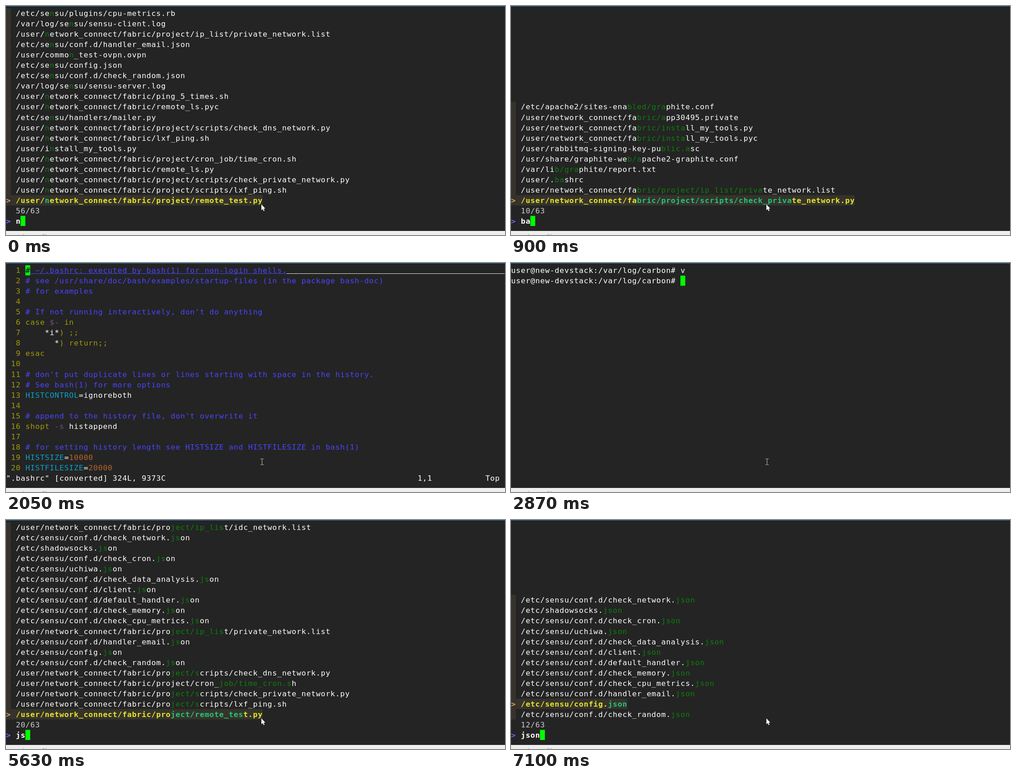
An HTML page with a canvas for the animation above (8000 ms loop, 1102x508 px).

```html
<!DOCTYPE html>
<html lang="en">
<head>
<meta charset="utf-8">
<title>Fuzzy file finder in a terminal</title>
<style>
  html, body { margin: 0; width: 100%; height: 100%; overflow: hidden; background: #242424; }
  canvas { display: block; width: 1102px; height: 508px; }
</style>
</head>
<body>
<canvas id="stage" width="1102" height="508"></canvas>
<script>
const ctx = document.getElementById('stage').getContext('2d');
const LOOP = 8000, CELL = 10.69, ROW = 23.03, TOP = 5, BASELINE = 17.2, LIST_ROWS = 19;
const FONT = '16.6px "DejaVu Sans Mono", monospace';

const C = {
  bg: '#242424', bar: '#35332b', cursor: '#00ff00', pointer: '#dfa06a', prompt: '#6c6aff',
  match: '#0a800a', picked: '#e9e42c', pickedMatch: '#22c67c', info: '#cccccc',
  w: '#ffffff', b: '#4a45ff', y: '#a09a08', p: '#75506f', c: '#08a2cb', n: '#b5652c'
};

const fabric = '/user/network_connect/fabric/';
const project = fabric + 'project/';
const confd = '/etc/sensu/conf.d/';

// Listed from the bottom of the screen upwards.
const files = [
  project + 'remote_test.py',
  project + 'scripts/lxf_ping.sh',
  project + 'scripts/check_private_network.py',
  fabric + 'remote_ls.py',
  project + 'cron_job/time_cron.sh',
  '/user/install_my_tools.py',
  fabric + 'lxf_ping.sh',
  project + 'scripts/check_dns_network.py',
  '/etc/sensu/handlers/mailer.py',
  '/tmp/date.txt',
  fabric + 'remote_ls.pyc',
  fabric + 'ping_5_times.sh',
  '/var/log/sensu/sensu-server.log',
  confd + 'check_random.json',
  '/etc/sensu/config.json',
  '/user/common_test-ovpn.ovpn',
  confd + 'handler_email.json',
  '/usr/share/dict/words',
  project + 'ip_list/private_network.list',
  '/var/log/sensu/sensu-client.log',
  '/etc/sensu/plugins/cpu-metrics.rb',
  '/user/.bashrc',
  '/var/lib/graphite/report.txt',
  '/usr/share/graphite-web/apache2-graphite.conf',
  '/user/rabbitmq-signing-key-public.asc',
  fabric + 'install_my_tools.pyc',
  fabric + 'install_my_tools.py',
  fabric + 'app30495.private',
  '/etc/apache2/sites-enabled/graphite.conf',
  ...['check_cpu_metrics', 'check_memory', 'default_handler', 'client', 'check_data_analysis']
    .map(name => confd + name + '.json'),
  '/etc/sensu/uchiwa.json',
  confd + 'check_cron.json',
  '/etc/shadowsocks.json',
  confd + 'check_network.json',
  project + 'ip_list/idc_network.list',
  project + 'ip_list/dev_network.list'
];

// Each segment starts with its colour key.
const vimLines = [
  'b# ~/.bashrc: executed by bash(1) for non-login shells.',
  'b# see /usr/share/doc/bash/examples/startup-files (in the package bash-doc)',
  'b# for examples',
  '',
  "b# If not running interactively, don't do anything",
  'ycase |p$-|y in',
  'w    *i*|y) ;;',
  'w      *|y) return;;',
  'yesac',
  '',
  "b# don't put duplicate lines or lines starting with space in the history.",
  'b# See bash(1) for more options',
  'cHISTCONTROL|w=ignoreboth',
  '',
  "b# append to the history file, don't overwrite it",
  'yshopt |p-s|w histappend',
  '',
  'b# for setting history length see HISTSIZE and HISTFILESIZE in bash(1)',
  'cHISTSIZE|w=|n10000',
  'cHISTFILESIZE|w=|n20000'
];

ctx.font = FONT;
const inset = (CELL - ctx.measureText('0').width) / 2;
const rowTop = row => TOP + row * ROW;

function fill(color, x, y, w, h) {
  ctx.fillStyle = color;
  ctx.fillRect(x, y, w, h);
}

function text(col, row, str, color, bold) {
  ctx.font = (bold ? 'bold ' : '') + FONT;
  ctx.fillStyle = color;
  const y = Math.round(rowTop(row) + BASELINE);
  [...str].forEach((ch, i) => ctx.fillText(ch, (col + i) * CELL + inset, y));
  return col + str.length;
}

function block(col, row) {
  fill(C.cursor, col * CELL, rowTop(row), CELL, 22.4);
}

// First forward match, then tightened from its end backwards.
function fuzzy(path, query) {
  let end = 0;
  for (const ch of query) {
    const at = path.indexOf(ch, end);
    if (at < 0) return null;
    end = at + 1;
  }
  let start = end;
  for (const ch of [...query].reverse()) start = path.lastIndexOf(ch, start - 1);
  return [start, end];
}

function arrow() {
  ctx.beginPath();
  [[564, 440], [564, 453], [567, 450.5], [569, 455], [571, 454], [569, 449.8], [572.5, 449.3]]
    .forEach(([x, y]) => ctx.lineTo(x, y));
  ctx.closePath();
  ctx.lineWidth = 1;
  ctx.strokeStyle = '#151515';
  ctx.stroke();
  ctx.fillStyle = '#ffffff';
  ctx.fill();
}

function beam() {
  fill('#c8c8c8', 565, 435, 1, 12);
  for (const y of [434, 447]) {
    fill('#c8c8c8', 562, y, 3, 1);
    fill('#c8c8c8', 566, y, 3, 1);
  }
}

function promptLine(query) {
  text(0, 20, '>', C.prompt, true);
  block(text(2, 20, query, C.w, true), 20);
}

function finder(query, count, selected = 0, typed = query) {
  const hits = files.map(path => ({ path, range: fuzzy(path, query) }))
    .filter(hit => hit.range).slice(0, LIST_ROWS);
  fill(C.bar, 0, rowTop(LIST_ROWS - hits.length), CELL, hits.length * ROW);
  hits.forEach(({ path, range: [from, to] }, i) => {
    const row = LIST_ROWS - 1 - i, on = i === selected;
    if (on) {
      fill(C.bar, CELL, rowTop(row), (path.length + 1) * CELL, ROW);
      text(0, row, '>', C.pointer, true);
    }
    const base = on ? C.picked : C.w;
    let col = text(2, row, path.slice(0, from), base, on);
    col = text(col, row, path.slice(from, to), on ? C.pickedMatch : C.match, on);
    text(col, row, path.slice(to), base, on);
  });
  text(2, 19, count + '/63', C.info);
  promptLine(typed);
  arrow();
}

function emptyFinder() {
  promptLine('');
  arrow();
}

const shellPrompt = 'user@new-devstack:/var/log/carbon# ';

function launching(pointer) {
  text(0, 0, shellPrompt + 'v', C.w);
  block(0, 1);
  pointer();
}

function shell(typed) {
  text(0, 0, shellPrompt + 'v', C.w);
  block(text(0, 1, shellPrompt + typed, C.w), 1);
  beam();
}

function vim() {
  block(4, 0);
  vimLines.forEach((line, row) => {
    text(1, row, String(row + 1).padStart(2), C.y);
    let col = 4;
    for (const part of line ? line.split('|') : []) {
      col = text(col, row, part.slice(1), C[part[0]]);
    }
  });
  text(4, 0, '#', '#000000');
  const textEnd = (3 + vimLines[0].length) * CELL;
  fill(C.b, 5 * CELL, 23, textEnd - 5 * CELL, 1);
  fill('#e8e8e8', textEnd, 23, 1101 - textEnd, 1);
  text(0, 20, '".bashrc" [converted] 324L, 9373C', C.w);
  text(85, 20, '1,1', C.w);
  text(99, 20, 'Top', C.w);
  beam();
}

const scenes = [
  [0, () => finder('n', 56)],
  [490, () => finder('n', 56, 0, '')],
  [520, () => finder('', 63)],
  [730, () => finder('b', 21)],
  [900, () => finder('ba', 10)],
  [1010, () => finder('bas', 5)],
  [1190, () => finder('bash', 1)],
  [1840, () => launching(arrow)],
  [1910, () => launching(beam)],
  [2050, vim],
  [2870, () => shell('')],
  [4230, () => shell('v')],
  [4570, emptyFinder],
  [4630, () => finder('', 63)],
  [5630, () => finder('js', 20)],
  [5730, () => finder('jso', 17)],
  [5910, () => finder('json', 12)],
  [7100, () => finder('json', 12, 1)]
];

function frame() {
  fill(C.bg, 0, 0, 1102, 508);
  fill('#0f76bd', 0, 0, 1102, 1);
  fill('#eeeeee', 0, 499, 1102, 9);
  ctx.font = '12px "Open Sans", sans-serif';
  ctx.fillStyle = '#888888';
  ctx.fillText('press keys to filter', 4, 516);
}

const begin = performance.now();
let shown = null;

function tick() {
  const t = (performance.now() - begin) % LOOP;
  const scene = scenes.findLast(([start]) => start <= t);
  if (scene !== shown) {
    shown = scene;
    frame();
    scene[1]();
  }
  requestAnimationFrame(tick);
}
tick();
</script>
</body>
</html>
```
